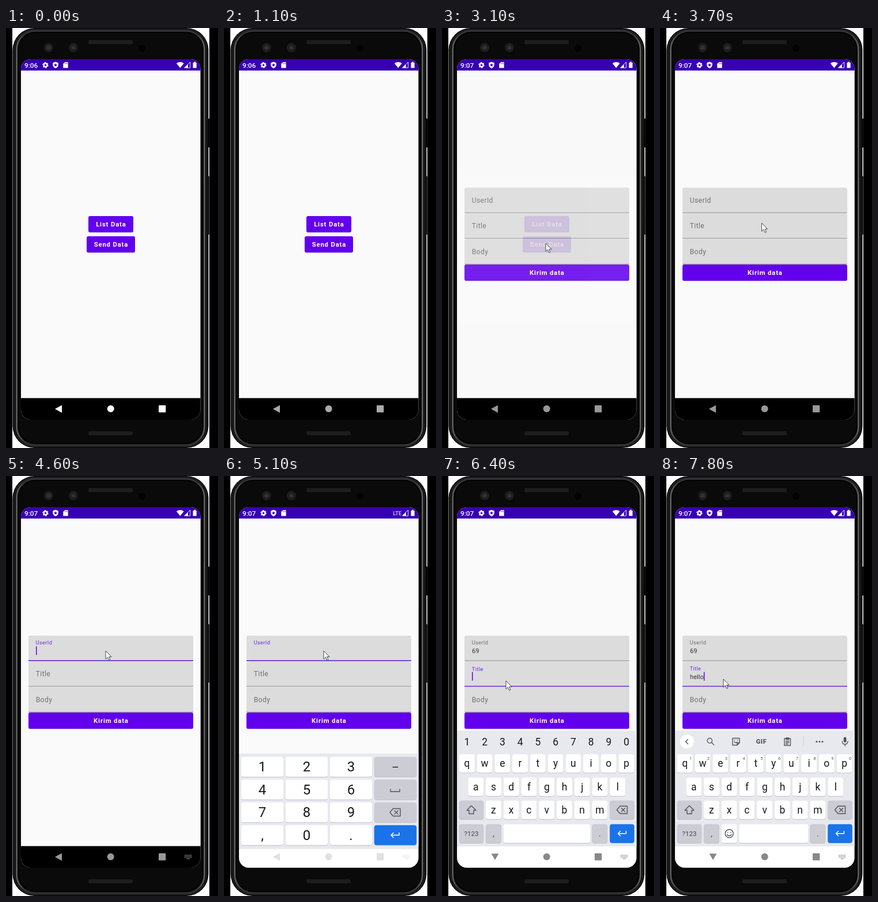
Recreate the animation shown at these times as an HTML page. Size 368x728 px, loop 8000 ms.

```html
<!DOCTYPE html>
<html lang="en">
<head>
<meta charset="utf-8">
<title>Form entry on a phone</title>
<style>
html, body { margin: 0; width: 100%; height: 100%; overflow: hidden; background: #000; }
svg { display: block; width: 368px; height: 728px; font-family: Roboto, Arial, sans-serif; }
.mid { text-anchor: middle; }
.btn { font-size: 11.3px; font-weight: 700; letter-spacing: .85px; fill: #fff; text-anchor: middle; }
.label { letter-spacing: .4px; }
.value { font-size: 11.2px; fill: #333; }
.line { fill: none; stroke: #50545a; stroke-width: 1.4; stroke-linejoin: round; stroke-linecap: round; }
</style>
</head>
<body>
<svg id="stage" viewBox="0 0 368 728">
  <defs>
    <clipPath id="screen"><rect x="26" y="54" width="311.5" height="625" rx="17"/></clipPath>
    <filter id="soft" x="-10%" y="-20%" width="120%" height="150%">
      <feDropShadow dx="0" dy=".8" stdDeviation=".7" flood-opacity=".3"/>
    </filter>
    <linearGradient id="rim" x2="1" y2="0">
      <stop offset="0" stop-color="#585858"/><stop offset=".04" stop-color="#343434"/>
      <stop offset=".96" stop-color="#343434"/><stop offset="1" stop-color="#585858"/>
    </linearGradient>
  </defs>

  <rect width="368" height="728"/>
  <rect x="11" width="342" height="728" fill="#fff"/>
  <rect x="349" y="157" width="5" height="50" rx="1" fill="#0b0b0b"/>
  <rect x="349" y="257" width="5" height="101" rx="1" fill="#2a2a2a"/>
  <rect x="11.5" y="0" width="340" height="728" rx="38" fill="#050505"/>
  <rect x="14.5" y="2.5" width="334" height="723" rx="35" fill="none" stroke="#222" stroke-width="2"/>
  <rect x="18.5" y="5" width="326" height="718" rx="32" fill="#0a0a0a" stroke="url(#rim)" stroke-width="3"/>
  <rect x="21.5" y="8" width="320" height="712" rx="29" fill="#0a0a0a" stroke="#000" stroke-width="1.5"/>
  <g fill="#1d1d1d">
    <rect x="143" y="21" width="77" height="7" rx="2"/>
    <rect x="143" y="699" width="77" height="7" rx="2"/>
    <circle cx="74" cy="34" r="8"/><circle cx="117" cy="34" r="8"/>
  </g>
  <g fill="#303036"><circle cx="74" cy="34" r="4"/><circle cx="117" cy="34" r="3.5"/></g>
  <circle cx="236" cy="35" r="6" fill="#020202"/>

  <g clip-path="url(#screen)">
    <rect x="26" y="54" width="312" height="625" fill="#fafafa"/>
    <g id="home"></g>
    <g id="form"><rect x="26" y="73" width="312" height="569" fill="#fafafa"/></g>
    <rect x="26" y="641.5" width="312" height="38"/>
    <g id="ime">
      <rect id="imeBack" x="26" width="312" fill="#e8e9ee"/>
      <rect x="26" y="642" width="312" height="240" fill="#fff"/>
      <g id="numeric"></g>
      <g id="letters"></g>
    </g>
    <g id="nav">
      <path id="back"/>
      <circle cx="181.7" cy="660" r="6"/>
      <rect x="265" y="654" width="12.3" height="12.3" rx="1"/>
      <g id="imeIcon"></g>
    </g>
    <rect x="26" y="54" width="312" height="19.7" fill="#3700b3"/>
    <g fill="#fff">
      <text id="clock" x="32" y="68.7" font-size="11.8" font-weight="500"></text>
      <circle cx="68.5" cy="64.3" r="3" fill="none" stroke="#fff" stroke-width="2.4"/>
      <circle cx="68.5" cy="64.3" r="4.5" fill="none" stroke="#fff" stroke-width="1.4" stroke-dasharray="2.4 2.31"/>
      <path d="M86 58.5l4.8 2v3.2q0 4-4.8 6-4.8-2-4.8-6v-3.2z"/>
      <path d="M86 61.3l.9 1.8 2 .2-1.5 1.4.4 2-1.8-1-1.8 1 .4-2-1.5-1.4 2-.2z" fill="#3700b3"/>
      <path d="M102.5 59h5.2v10.3h-8.4v-7z"/>
      <path d="M102.7 60.5v2M104.6 60.5v2M106.4 60.5v2" stroke="#3700b3" stroke-width=".8"/>
      <path id="wifi" d="M302.3 69.3L295.8 61.2Q302.3 56.6 308.8 61.2Z"/>
      <text id="lte" x="293.5" y="68" font-size="9.5">LTE</text>
      <path d="M309.7 69L319.7 59V69Z" fill="none" stroke="#fff" stroke-width=".9"/>
      <path d="M309.5 69L315.8 62.8V69Z"/>
      <path d="M324.5 60h1.8v-1.4h2.6V60h1.8v9.3h-6.2z"/>
    </g>
  </g>
  <path id="cursor" d="M0 0V14.3L3.4 11.2 5.7 16.5 8 15.5 5.7 10.4H10Z" fill="#fff" stroke="#333" stroke-width=".9"/>
</svg>
<script>
const NS = 'http://www.w3.org/2000/svg';
const $ = id => document.getElementById(id);
const PURPLE = '#6200ee', FOCUS = '#6c2be0', GREY = '#cbccd4', BLUE = '#1a73e8', INK = '#17181a';

function set(el, attrs) {
  for (const k in attrs) el.setAttribute(k, attrs[k]);
  return el;
}
function add(parent, tag, attrs, text) {
  const el = set(document.createElementNS(NS, tag), attrs);
  if (text !== undefined) el.textContent = text;
  return parent.appendChild(el);
}
const box = (g, x, y, width, height, fill, rx = 0) => add(g, 'rect', { x, y, width, height, fill, rx });
const icon = (g, d, attrs = {}) => add(g, 'path', { class: 'line', d, ...attrs });
const show = (el, on) => el.setAttribute('visibility', on ? 'visible' : 'hidden');

function button(g, x, y, w, text) {
  const face = box(g, x, y, w, 28, PURPLE, 3);
  face.setAttribute('filter', 'url(#soft)');
  add(g, 'text', { class: 'btn', x: x + w / 2 + .4, y: y + 18.4 }, text);
  return face;
}
button($('home'), 143, 326, 78, 'List Data');
const sendFace = button($('home'), 140, 361, 84, 'Send Data');

function field(y, name) {
  const g = $('form');
  add(g, 'path', { d: `M39 ${y + 44}V${y + 3}q0-3 3-3H322q3 0 3 3V${y + 44}z`, fill: '#dcdcdc' });
  return {
    y,
    rule: box(g, 39, y + 43, 286, 1, '#8a8a8a'),
    label: add(g, 'text', { class: 'label', x: 51.7 }, name),
    value: add(g, 'text', { class: 'value', x: 52, y: y + 30.4 }, ''),
    caret: box(g, 52, y + 18.5, 1.5, 15, PURPLE)
  };
}
const [user, title, body] = [[276.7, 'UserId'], [321.2, 'Title'], [365.7, 'Body']].map(a => field(...a));
button($('form'), 39, 410, 286, 'Kirim data');

// floated: 0 = resting hint, 1 = small label above the value
function drawField(f, floated, focused, text, caretOn) {
  set(f.label, {
    y: f.y + 26 - 10.3 * floated,
    'font-size': 12.1 - 3 * floated,
    fill: focused ? FOCUS : '#707070'
  });
  set(f.rule, { y: f.y + (focused ? 42.5 : 43), height: focused ? 1.7 : 1, fill: focused ? FOCUS : '#8a8a8a' });
  f.value.textContent = text;
  show(f.caret, caretOn);
  if (caretOn) f.caret.setAttribute('x', 52 + (text ? f.value.getComputedTextLength() : 0));
}

function key(g, cx, cy, w, h, text, size, fill = '#fff', ink = INK) {
  box(g, cx - w / 2, cy - h / 2 + 1, w, h, '#bfc1c8', 4);
  box(g, cx - w / 2, cy - h / 2, w, h, fill, 4);
  if (text) add(g, 'text', { class: 'mid', x: cx, y: cy + size * .35, 'font-size': size, fill: ink }, text);
}
const enterIcon = (g, x, y) => icon(g, `M${x + 7} ${y - 4}v4h-14m4 -4l-4 4 4 4`, { style: 'stroke:#fff;stroke-width:1.6' });
const eraseIcon = (g, x, y) => icon(g, `M${x - 9} ${y}l5.5-6.5h12.5v13h-12.5zM${x - 1} ${y - 3}l6 6m0-6l-6 6`);

const num = $('numeric');
['1', '2', '3', '–', '4', '5', '6', '', '7', '8', '9', '', ',', '0', '.', ''].forEach((c, i) => {
  const col = i % 4, row = i >> 2;
  const fill = col < 3 ? '#fff' : row < 3 ? GREY : BLUE;
  key(num, 66.5 + 77 * col, 500 + 39.5 * row, 73.5, 34.5, c, col < 3 ? 24 : 19, fill);
});
icon(num, 'M289 539v4h16v-4');
eraseIcon(num, 297, 579);
enterIcon(num, 297, 618.5);

const abc = $('letters'), PITCH = 30.75;
const letters = (chars, x, y) => [...chars].forEach((c, i) => key(abc, x + PITCH * i, y, 27, 32, c, 17.5));
letters('qwertyuiop', 43.3, 498.3);
letters('asdfghjkl', 58.8, 538.8);
letters('zxcvbnm', 89.4, 578.8);
key(abc, 51, 578.8, 42.5, 32.5, '', 0, GREY);
key(abc, 312.5, 578.8, 42.5, 32.5, '', 0, GREY);
key(abc, 51, 619.7, 42.5, 32.5, '?123', 11.5, GREY, '#44474c');
key(abc, 89.4, 619.7, 27, 32.5, ',', 15, GREY, '#55585d');
key(abc, 273.7, 619.7, 27, 32.5, '.', 15, GREY, '#55585d');
key(abc, 312.5, 619.7, 42.5, 32.5, '', 0, BLUE);
icon(abc, 'M51 571.5l-8 8h4v6h8v-6h4z');
eraseIcon(abc, 312.5, 578.8);
enterIcon(abc, 312.5, 619.7);

// the top strip holds digits first, then the toolbar
const digits = add(abc, 'g', {}), tools = add(abc, 'g', {});
key(digits, 181.8, 619.7, 150.5, 32.5, '', 0);
key(tools, 120.2, 619.7, 27, 32.5, '', 0);
key(tools, 197.2, 619.7, 120, 32.5, '', 0);
[...'1234567890'].forEach((c, i) => {
  const x = 43.3 + PITCH * i;
  add(digits, 'text', { class: 'mid', x, y: 467, 'font-size': 17.5, fill: INK }, c);
  add(tools, 'text', { class: 'mid', x: x + 10, y: 491.5, 'font-size': 7.5, fill: '#555' }, c);
});
add(tools, 'circle', { class: 'line', cx: 120.2, cy: 619.7, r: 7 });
icon(tools, 'M117.5 617.5v.5M123 617.5v.5M116.5 621.5q3.7 4.5 7.4 0');
add(tools, 'circle', { cx: 46.7, cy: 460.3, r: 12, fill: '#fff' });
icon(tools, 'M48.5 456.5l-4 4 4 4');
add(tools, 'circle', { class: 'line', cx: 86.3, cy: 458.7, r: 4.2 });
icon(tools, 'M89.5 462l4 4');
icon(tools, 'M126 454.5h12v8l-4 4h-8zM138 462.5h-4v4M129.5 457.5v.5M134.5 457.5v.5M129 461q2.5 2.5 5 0');
add(tools, 'text', { class: 'mid', x: 176, y: 464.2, 'font-size': 11, 'font-weight': 800, 'letter-spacing': .6, fill: '#50545a' }, 'GIF');
icon(tools, 'M216 455h10.5v12h-10.5zM219 454h4.5v2.5h-4.5zM218.5 459.5h5.5M218.5 462h5.5M218.5 464.5h3.5');
box(tools, 248.5, 451, 1, 18, '#d2d4d9');
[272, 277, 282].forEach(cx => add(tools, 'circle', { cx, cy: 460.5, r: 1.5, fill: '#50545a' }));
box(tools, 318.7, 452.5, 4.8, 9.5, '#50545a', 2.4);
icon(tools, 'M316.3 460q0 5 4.8 5t4.8-5M321.1 465v3');

for (let i = 0; i < 15; i++) {
  add($('imeIcon'), 'rect', { x: 310 + (i % 5) * 2.6, y: 656.6 + Math.floor(i / 5) * 2, width: 1.7, height: 1.1 });
}
add($('imeIcon'), 'rect', { x: 313.5, y: 662.8, width: 5.5, height: 1 });

const clamp = v => Math.max(0, Math.min(1, v));
const ramp = (t, a, b) => clamp((t - a) / (b - a));
const mix = (a, b, p) => a + (b - a) * p;
const typed = (text, times, t) => text.slice(0, times.filter(at => t >= at).length);
const between = (t, ...spans) => spans.some(([a, b]) => t >= a && t < b);

// time, x, y of the pointer tip
const PATH = [[2700, 180, 373], [3300, 180, 373], [4100, 173, 303], [5500, 173, 303], [6100, 111, 355], [6500, 111, 355], [6800, 110, 352]];
function pointer(t) {
  const i = PATH.findIndex(p => p[0] > t);
  if (i < 0) return PATH.at(-1).slice(1);
  const a = PATH[Math.max(0, i - 1)], b = PATH[i], p = ramp(t, a[0], b[0]), e = p * p * (3 - 2 * p);
  return [mix(a[1], b[1], e), mix(a[2], b[2], e)];
}

function draw(t) {
  $('clock').textContent = t < 1500 ? '9:06' : '9:07';
  const lte = between(t, [4900, 6200]);
  show($('lte'), lte);
  show($('wifi'), !lte);

  sendFace.setAttribute('fill', between(t, [2700, 3000]) ? '#7b2bf1' : PURPLE);
  $('form').setAttribute('opacity', t < 3000 ? 0 : t < 3100 ? .45 : t < 3200 ? .88 : 1);

  const onUser = between(t, [4400, 6200]), onTitle = t >= 6200;
  drawField(user, ramp(t, 4400, 4570), onUser, typed('69', [5400, 5700], t),
    between(t, [4500, 5000], [5400, 6200]));
  drawField(title, ramp(t, 6250, 6420), onTitle, typed('hello', [7100, 7200, 7400, 7600, 7800], t),
    between(t, [6300, 6800], [7100, 8000]));
  drawField(body, 0, false, '', false);

  const alpha = t >= 6300, full = t >= 6600;
  show($('ime'), t >= 4700);
  if (t >= 4700) {
    const top = alpha ? 441.5 : 477;
    set($('imeBack'), { y: top, height: 642 - top });
    $('ime').setAttribute('transform', `translate(0 ${200 * (1 - ramp(t, 4700, 5250)) ** 3})`);
  }
  $('numeric').style.display = alpha ? 'none' : '';
  $('letters').style.display = alpha ? '' : 'none';
  digits.style.display = full ? 'none' : '';
  tools.style.display = full ? '' : 'none';

  const shade = Math.round(t < 4700 ? mix(255, 152, ramp(t, 200, 1300))
    : t < 5100 ? mix(152, 224, ramp(t, 4700, 5000)) : mix(224, 136, ramp(t, 5100, 5500)));
  $('nav').setAttribute('fill', `rgb(${shade},${shade},${shade})`);
  $('back').setAttribute('d', t < 5300 ? 'M85 660.3L97 653.7V667Z' : 'M85.5 654.5H98.5L92 665.5Z');
  show($('imeIcon'), t >= 4500);

  show($('cursor'), t >= 2700);
  $('cursor').setAttribute('transform', `translate(${pointer(t).join(' ')})`);
}

const LOOP = 8000, STEP = 100;
const start = performance.now();
function tick() {
  const t = (performance.now() - start) % LOOP;
  draw(Math.floor(t / STEP) * STEP);
  requestAnimationFrame(tick);
}
tick();
</script>
</body>
</html>
```
